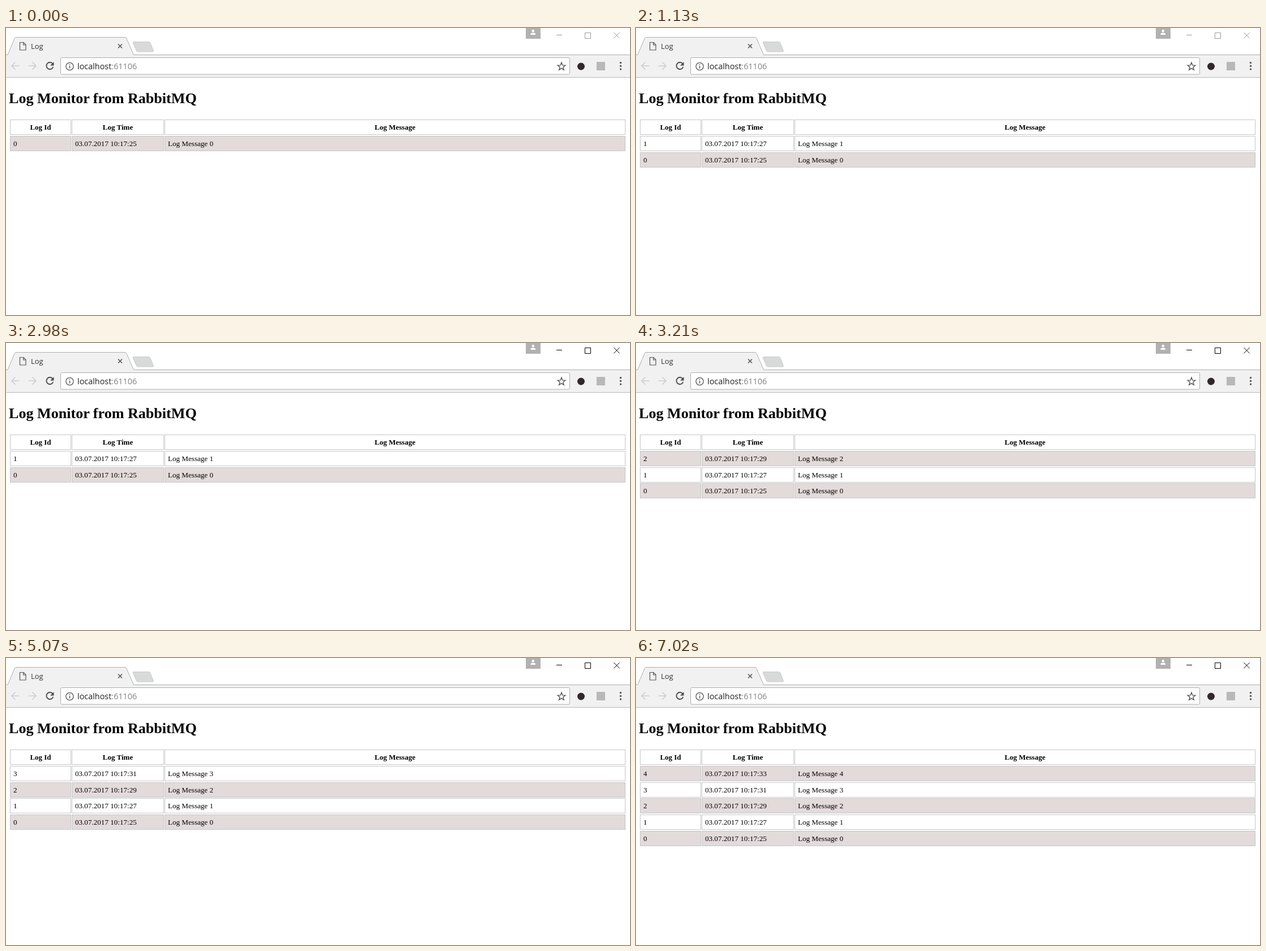
Write an HTML page that moves like this. It is 1102 by 508 pixels and loops after 8 s.

```html
<!DOCTYPE html>
<html lang="en">
<head>
<meta charset="utf-8">
<title>Log</title>
<style>
  html, body { margin: 0; width: 100%; height: 100%; overflow: hidden; background: #fff; }
  svg { display: block; }
  .ui { font-family: "Open Sans", "Noto Sans", sans-serif; }
  .page { font-family: "Liberation Serif", "Times New Roman", serif; font-size: 13.1px; }
  .head { font-weight: bold; font-size: 13px; text-anchor: middle; }
  .line { fill: none; }
</style>
</head>
<body>
<svg width="1102" height="508" viewBox="0 0 1102 508">
  <rect width="1102" height="508" fill="#fff"/>

  <!-- tab strip and toolbar -->
  <rect y="47" width="1102" height="40" fill="#f1f1f1"/>
  <path d="M0 47.5H3L15.2 18.4Q16 16.5 18 16.5H210Q212 16.5 212.8 18.4L225.5 47.5H1102" fill="#f1f1f1" stroke="#adadad"/>
  <path d="M0 87.5H1102" stroke="#b9b9b9"/>
  <path d="M226 24.5H252Q254 24.5 254.8 26.3L260.3 40Q261 42 259 42H233Q231 42 230.2 40L224.2 26.3Q223.6 24.5 226 24.5Z" fill="#d8dad9" stroke="#c9cbca"/>
  <path class="line" d="M24.5 25.5H31L35 29.5V39H24.5ZM30.7 25.5V30H35" stroke="#555" stroke-width="1.2"/>
  <text class="ui" x="44" y="37" font-size="13" fill="#333">Log</text>
  <path d="M198 28.5L205 35.5M205 28.5L198 35.5" stroke="#555" stroke-width="1.6"/>

  <!-- navigation -->
  <g class="line" stroke-width="1.6">
    <path d="M23.5 67H10M16.5 60.5L10 67L16.5 73.5" stroke="#cdcdcd"/>
    <path d="M39.5 67H53M46.5 60.5L53 67L46.5 73.5" stroke="#cdcdcd"/>
    <path d="M82.4 63.2A6.1 6.1 0 1 0 83.3 68.8" stroke="#4c4c4c" stroke-width="1.9"/>
  </g>
  <path d="M84.5 60V66.5H78Z" fill="#4c4c4c"/>

  <!-- address bar -->
  <rect x="96.5" y="52.5" width="899" height="29.5" rx="2" fill="#fff" stroke="#adadad"/>
  <circle class="line" cx="112.5" cy="68" r="6.6" stroke="#555" stroke-width="1.3"/>
  <path d="M112.5 67V71.6M112.5 64V65.6" stroke="#555" stroke-width="1.5"/>
  <text class="ui" x="126" y="73" font-size="14.4" fill="#222">localhost<tspan fill="#808080">:61106</tspan></text>
  <path id="star" class="line" stroke="#555" stroke-width="1.4"/>
  <circle cx="1015.5" cy="68" r="6.5" fill="#30282b"/>
  <rect x="1043" y="60" width="15" height="15" fill="#b8b8b8"/>
  <g fill="#555">
    <circle cx="1085.5" cy="61.5" r="1.7"/>
    <circle cx="1085.5" cy="67.2" r="1.7"/>
    <circle cx="1085.5" cy="72.9" r="1.7"/>
  </g>

  <!-- window buttons -->
  <rect x="918" width="26" height="19" fill="#b1b1b1"/>
  <circle cx="930.8" cy="5.3" r="2.2" fill="#fff"/>
  <path d="M926.5 12V10.6Q926.5 8.6 930.8 8.6T935.1 10.6V12Z" fill="#fff"/>
  <path id="controls" class="line" d="M972 12.5H982M1022.5 8.5H1032.5V18.5H1022.5ZM1073.3 8L1083.7 18.4M1083.7 8L1073.3 18.4"/>

  <!-- page -->
  <g class="page">
    <text x="5" y="133" font-size="26.1" font-weight="bold">Log Monitor from RabbitMQ</text>
    <g id="table"></g>
  </g>
</svg>
<script>
const LOOP = 8000;
const FOCUS_AT = 2980;
const ARRIVALS = [0, 1130, 3070, 5070, 7020];
const COLUMNS = [[7, 115], [116, 279], [280, 1094]];
const TITLES = ["Log Id", "Log Time", "Log Message"];
const ROW_HEIGHT = 27;

const byId = id => document.getElementById(id);
const table = byId("table");
const controls = byId("controls");

function add(parent, tag, attrs, text) {
  const node = document.createElementNS("http://www.w3.org/2000/svg", tag);
  for (const name in attrs) node.setAttribute(name, attrs[name]);
  if (text) node.textContent = text;
  parent.appendChild(node);
  return node;
}

function starPath(cx, cy, outer, inner) {
  const points = Array.from({ length: 10 }, (_, i) => {
    const r = i % 2 ? inner : outer;
    const a = i * Math.PI / 5 - Math.PI / 2;
    return (cx + r * Math.cos(a)).toFixed(2) + " " + (cy + r * Math.sin(a)).toFixed(2);
  });
  return "M" + points.join("L") + "Z";
}

function addRow(cells, fill, isHead) {
  const row = add(table, "g", {});
  COLUMNS.forEach(([left, right], i) => {
    add(row, "rect", {
      x: left + 0.5, y: 0.5, width: right - left - 1, height: ROW_HEIGHT - 1,
      fill, stroke: "#c6c6c6"
    });
    add(row, "text", {
      x: isHead ? (left + right) / 2 : left + 6, y: 18,
      class: isHead ? "head" : ""
    }, cells[i]);
  });
  return row;
}

function place(row, slot) {
  const top = Math.floor(162.6 + 28.7 * slot);
  row.setAttribute("transform", `translate(0 ${top})`);
}

byId("star").setAttribute("d", starPath(981, 68.3, 7.2, 3));
place(addRow(TITLES, "#fff", true), 0);
const rows = ARRIVALS.map((_, id) => addRow(
  [String(id), `03.07.2017 10:17:${25 + 2 * id}`, `Log Message ${id}`],
  id % 2 ? "#fff" : "#e3dada", false
));

function draw(t) {
  const count = ARRIVALS.filter(at => at <= t).length;
  rows.forEach((row, id) => {
    row.setAttribute("visibility", id < count ? "visible" : "hidden");
    place(row, count - id);
  });
  controls.setAttribute("stroke", t < FOCUS_AT ? "#999" : "#000");
}

const start = performance.now();
function tick() {
  draw((performance.now() - start) % LOOP);
  requestAnimationFrame(tick);
}
tick();
</script>
</body>
</html>
```
